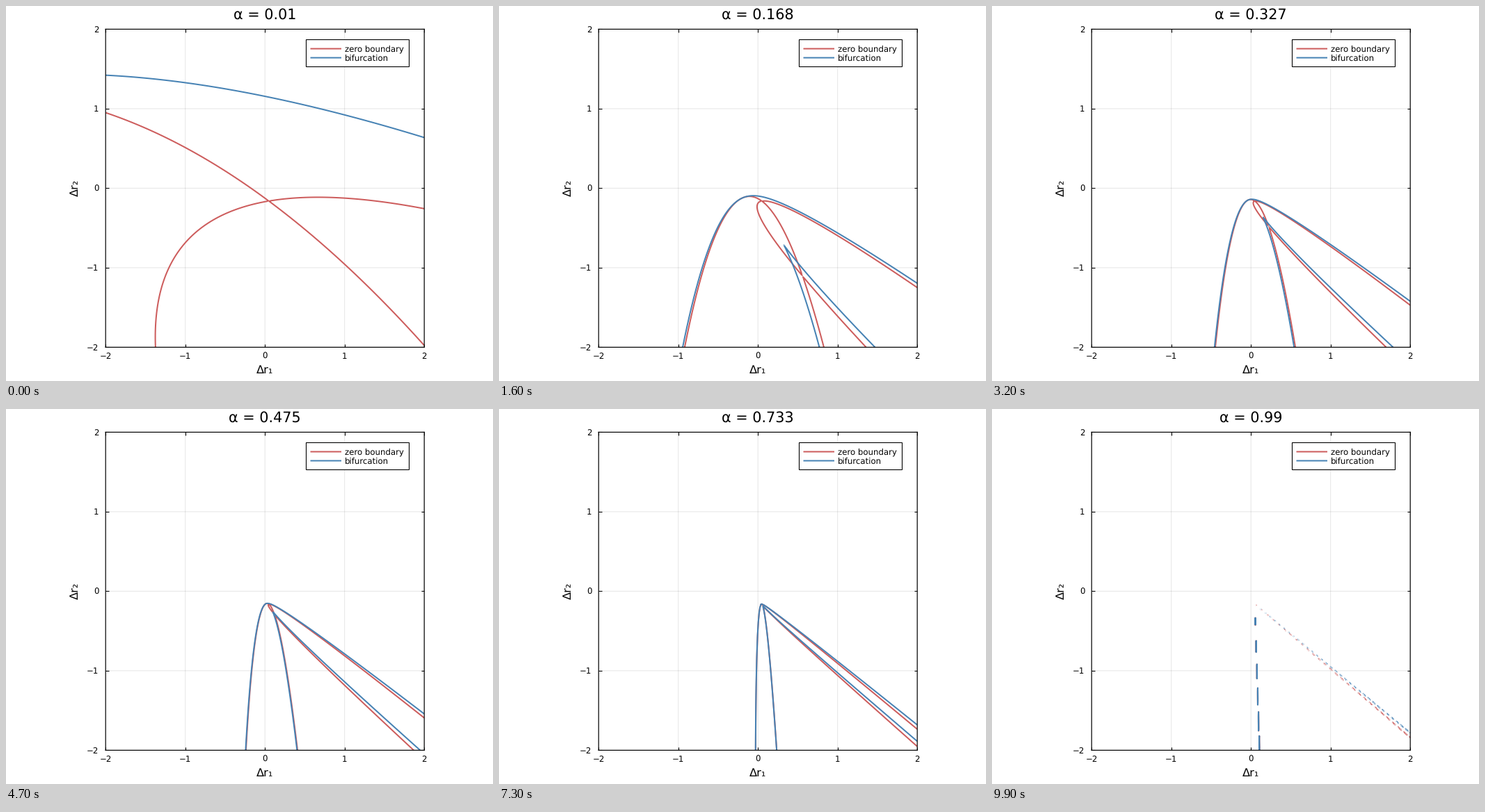
A matplotlib script for the animation above (10 s loop, 700x540 px).

```python
import numpy as np
import matplotlib.pyplot as plt
from matplotlib.animation import FuncAnimation
from matplotlib.lines import Line2D
from matplotlib.patches import Rectangle
from matplotlib.transforms import Affine2D

W, H = 700, 540
LEFT, RIGHT, TOP, BOTTOM = 143.2, 601.2, 33.4, 491.4
RED, BLUE = "#CD5C5C", "#4682B4"
FRAMES = 100
PT = 0.72  # points per pixel at 100 dpi

# Two-variable quadratic system in the skewed basis (BETA, -1), (1, -GAMMA):
#   M = M1 s + M2 t + s^2 + P s t
#   N = N1 s + N2 t + t^2
C1, C2 = 0.0483, -0.161
BETA, GAMMA = 0.0319, 0.8608
M1, M2, P = -0.0386, -0.2555, 0.352
N1, N2 = 0.3218, 0.2493

plt.rcParams.update({
    "font.family": "DejaVu Sans",
    "text.hinting": "none",
    "path.simplify": False,  # keeps the tiny contour loops
})
fig = plt.figure(figsize=(7, 5.4), dpi=100, facecolor="white")
ax = fig.add_axes([LEFT / W, 1 - BOTTOM / H, (RIGHT - LEFT) / W, (BOTTOM - TOP) / H])

grid = np.linspace(-2, 2, 400)
X, Y = np.meshgrid(grid, grid)


def label(x, y, text, size, **kw):
    """Text with its baseline at pixel (x, y)."""
    kw = {"ha": "center", "va": "baseline", **kw}
    return fig.text(x / W, 1 - y / H, text, fontsize=size * PT, zorder=10, **kw)


def setup():
    ax.set(xlim=(-2, 2), ylim=(-2, 2))
    ticks = range(-2, 3)
    ax.set_xticks(ticks, [])
    ax.set_yticks(ticks, [])
    ax.tick_params(direction="in", top=True, right=True, length=4.5 * PT, width=1.1 * PT)
    ax.set_axisbelow(True)
    ax.grid(color="black", alpha=0.1, linewidth=PT)
    for line in ax.get_xgridlines() + ax.get_ygridlines():
        line.set_snap(False)
    for spine in ax.spines.values():
        spine.set(linewidth=1.2 * PT, snap=False)

    for v in ticks:
        text = str(v).replace("-", "\u2212")
        label(LEFT + (v + 2) * (RIGHT - LEFT) / 4, 507.8, text, 11.8)
        label(133.3, BOTTOM - (v + 2) * (BOTTOM - TOP) / 4 + 4.3, text, 11.8, ha="right")
    label(372, 529, "Δr₁", 16.2)
    label(103.5, 262, "Δr₂", 16.2, rotation=90, rotation_mode="anchor")


def legend():
    to_fig = Affine2D().scale(1 / W, -1 / H).translate(0, 1) + fig.transFigure

    def place(artist):
        artist.set(transform=to_fig, snap=False)
        fig.add_artist(artist)

    place(Rectangle((431.5, 48.5), 148, 39, fc="white", ec="black", lw=1.1 * PT, zorder=8))
    for y, color, text in ((61.5, RED, "zero boundary"), (74.5, BLUE, "bifurcation")):
        place(Line2D([438.5, 481], [y, y], color=color, lw=2 * PT, zorder=9))
        label(486.7, y + 4.4, text, 11.8, ha="left")


def fields(alpha):
    """Functions whose zero sets are the two families of curves."""
    k = (1 - alpha) ** 2 / alpha
    x, y = (X - C1) / k, (Y - C2) / k
    n = (x + BETA * y) / (1 - BETA * GAMMA)
    m = -y - GAMMA * n

    s, t = n / N1, m / M2
    zero = (m - M1 * s - s**2) * (n - N2 * t - t**2)

    # Eliminating s and shifting t by h leaves (t^2 + g)^2 = r2 t^2 + r1 t + r0.
    # Its discriminant marks the folds; "gap" is p^2 - 4r without cancellation.
    h = (N1 * P / 2 - N2) / 2
    w = M1 + P * h
    g = -h**2 - n - N1 * M1 / 2
    r2 = (N1 * P / 2) ** 2
    r1 = N1**2 * (w * P / 2 - M2)
    r0 = N1**2 * (w**2 / 4 - M2 * h + m)
    p, r = 2 * g - r2, g**2 - r0
    gap = r2**2 - 4 * g * r2 + 4 * r0
    fold = 16 * r * gap**2 + 4 * p * r1**2 * (36 * r - p**2) - 27 * r1**4
    return zero, fold


setup()
legend()
title = label(372, 18.3, "", 20.8)
curves = []


def update(frame):
    alpha = 0.01 + 0.98 * frame / (FRAMES - 1)
    while curves:
        curves.pop().remove()
    for field, color in zip(fields(alpha), (RED, BLUE)):
        curves.append(ax.contour(X, Y, field, levels=[0], colors=[color],
                                 linewidths=2 * PT, linestyles="solid", zorder=2))
    title.set_text(f"α = {round(alpha, 3)}")
    return [title]


anim = FuncAnimation(fig, update, frames=FRAMES, interval=100, repeat=True, repeat_delay=0)
plt.show()
```
